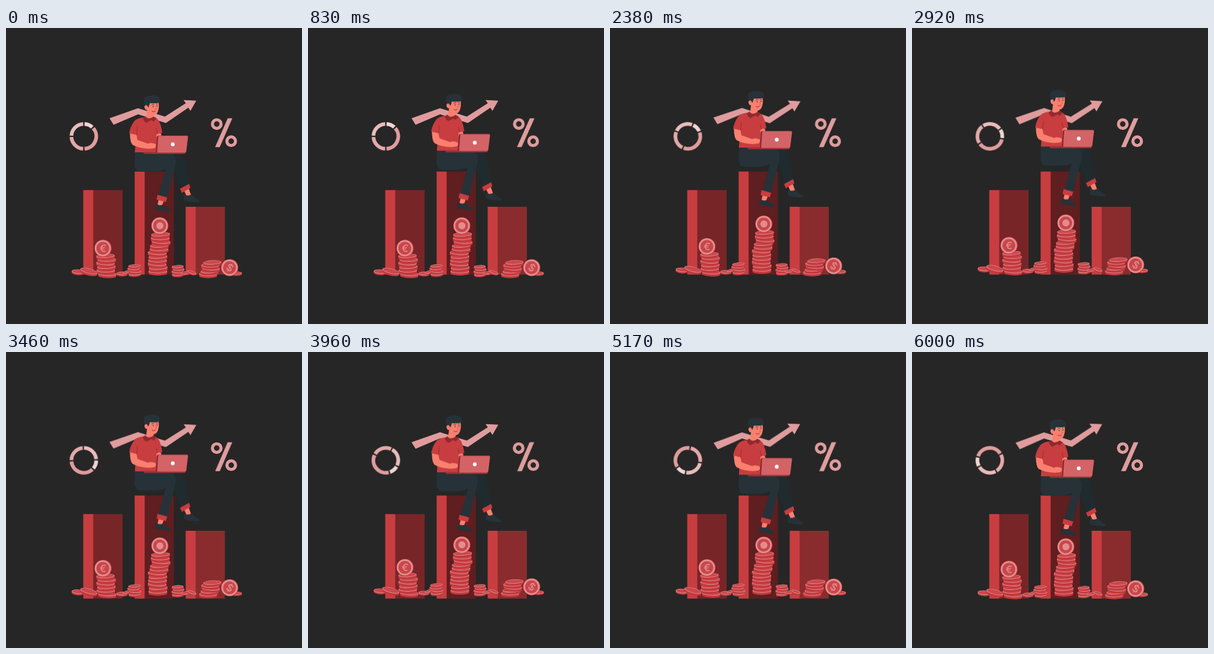
Write an HTML page that moves like this. It is 500 px wide and 500 px high and loops after 6.04 s.

```html
<!DOCTYPE html>
<html lang="en">
<head>
<meta charset="utf-8">
<title>Growth chart</title>
<style>
  html, body { margin: 0; width: 100%; height: 100%; overflow: hidden; background: #262626; }
  svg { display: block; width: 100%; height: 100%; }
  svg g { animation: 6.04s linear infinite; }

  #man { animation-name: float; }
  #coins { animation-name: lateFloat; }
  #donut { animation-name: spin; transform-origin: 131.5px 183px; }
  #percent { animation-name: sway; transform-origin: 368px 177px; }
  #arrow { animation-name: lateSway; transform-origin: 248px 142px; }

  @keyframes float {
    0%, 99.34%, 100% { transform: translateY(0); }
    49.67% { transform: translateY(-10px); }
  }
  /* starts at 1.5 s, cut off by the loop */
  @keyframes lateFloat {
    0%, 24.83% { transform: translateY(0); }
    74.5% { transform: translateY(-10px); }
    100% { transform: translateY(-4.87px); }
  }
  /* 60 degrees per second from 2 s on */
  @keyframes spin {
    0%, 33.11% { transform: rotate(0); }
    100% { transform: rotate(242.4deg); }
  }
  @keyframes sway {
    0%, 99.34%, 100% { transform: rotate(0); }
    24.83% { transform: rotate(1deg); }
    74.5% { transform: rotate(-1deg); }
  }
  @keyframes lateSway {
    0%, 16.56% { transform: rotate(0); }
    41.39% { transform: rotate(1deg); }
    91.06% { transform: rotate(-1deg); }
    100% { transform: rotate(-.64deg); }
  }

  .red { fill: #c83d40; }
  .dark { fill: #263238; }
  .skin { fill: #f9806f; }
  .pink { fill: #e09c9d; }
  .line { fill: none; stroke-linecap: round; }
  text { font: 500 17px Inter, Arial, sans-serif; text-anchor: middle; fill: #e28c8e; }
</style>
</head>
<body>
<svg viewBox="0 0 500 500">
  <g id="donut" fill="none" stroke-width="6.2"></g>

  <g id="percent">
    <path class="pink" d="M374.5 152.5H382.3L361 201.3H353.2Z"/>
    <circle cx="356" cy="162.3" r="7.3" fill="none" stroke="#e09c9d" stroke-width="5.2"/>
    <circle cx="380.4" cy="191.2" r="7.3" fill="none" stroke="#e09c9d" stroke-width="5.2"/>
  </g>

  <g id="arrow">
    <path class="pink" stroke="#e09c9d" stroke-width="1.1" d="M175.7 152.7L223 136.2L268.5 150.2L304.5 127.3L301 122.3L320.5 123.2L311.5 139L308.2 133.8L270 160L223 145.3L182 162.8Z"/>
  </g>

  <path fill="#782528" d="M147 273.7H197V416.5H147Z"/>
  <path class="red" d="M130.5 273.7H147.4V416.5H130.5Z"/>
  <path fill="#5f1e20" d="M234 242.6H283.5V416.5H234Z"/>
  <path class="red" d="M217.3 242.6H234.2V416.5H217.3Z"/>
  <path fill="#8a2c2e" d="M320 302H369.7V416.5H320Z"/>
  <path class="red" d="M303.5 302H320.3V416.5H303.5Z"/>

  <g id="man">
    <!-- feet -->
    <path class="skin" d="M301 275L308.5 271L313 283Q309 287 305 284Z"/>
    <path class="dark" d="M301 281Q306 285 313.5 281Q319 287 326 291Q328 293.5 325 294.5Q312 294 302 291.5Q298.5 290 301 281Z"/>
    <path class="skin" d="M258 290L266.5 292L264 299Q259 301 256 298Z"/>
    <path class="dark" d="M253.3 297Q258 301 265 298.5Q270 303.5 277.5 306.5Q279 310 274 310.2Q263 308.5 253 307.3Q250.5 305 253.3 297Z"/>
    <!-- legs -->
    <path fill="#202b30" d="M262 211H289Q299 212 301.5 221L311 265L297 273L280 231Z"/>
    <path class="dark" d="M218 209L276 210Q289 215 286.5 230L272.3 287L257 283L270 238Q262 242.5 248 242.5H226Q219 242 217 232Z"/>
    <path class="red" d="M294 271.5L309.3 263.3L311.5 270.3L297 278.5Z"/>
    <path class="red" d="M256 281.7L272.3 286.3L270 294L254.3 290Z"/>

    <!-- neck, shirt -->
    <path class="skin" d="M238.5 136L236.5 152Q243 160 249.5 151L249 144Z"/>
    <path class="red" d="M232 151Q222 152 217 157Q210 166 208 177.5L220 180.5L217.7 210H255L258 180L264 177Q262 162 257 155Q253 151 249.5 150.5Q245 159 236 151.5Z"/>
    <path class="line" d="M222 167L220.5 181M253.5 170L256 180" stroke="#8f2a2e" stroke-width=".8"/>
    <path fill="#8f2a2e" d="M235.5 149Q240 156 249.5 149.5L254.5 152.5L249.5 158L245.5 155.5L237.5 160Q231.5 157 231 152Z"/>

    <!-- head -->
    <path class="skin" d="M237 125L257.3 122.5Q259 131 257.8 136.5Q256 146.5 250 147.5Q243 147.5 238.5 139Z"/>
    <path class="dark" d="M235.5 133Q231.8 127 233 120Q236 114 244 114.5Q250 112.5 257 116Q261.5 119 259.3 126Q254 128 243 127Q242.5 131 239.5 135.5Z"/>
    <ellipse class="skin" cx="237" cy="134.3" rx="2.9" ry="4" transform="rotate(-18 237 134.3)"/>
    <circle class="dark" cx="248.6" cy="132.6" r=".9"/>
    <circle class="dark" cx="255.2" cy="131.6" r=".9"/>
    <path class="line" d="M246.3 130Q248.3 128.3 250 129.3M253.7 128.8L256 128.6" stroke="#263238" stroke-width=".8"/>
    <path class="line" d="M252.8 132.5L254.3 136.8L252.3 137.3" stroke="#d3554c" stroke-width=".8"/>
    <path class="line" d="M246.5 140.5Q249.5 143 252.3 140.3" stroke="#7c2528" stroke-width=".9"/>

    <!-- arms and laptop -->
    <path class="skin" d="M254 180Q259 176.5 262 179L263.5 187H255Z"/>
    <path fill="#9d3235" d="M232 209.5H303.5Q304 212.5 301 212.8H235Q232 212.5 232 209.5Z"/>
    <path class="skin" d="M209.3 177.8L220.5 180.5L222 189L240 195.4Q246 193 252.5 196Q254.5 199.5 251 203L241 204Q224 203 214 197.5Q209.5 194 209.3 177.8Z"/>
    <path fill="#7f282b" d="M255 184Q255.5 181.5 258 181.5L259 210.5H253.3Z"/>
    <path fill="#d36366" d="M259 182H305.5Q307.7 182.2 307.5 184L304.5 208.5Q304 210.6 301.5 210.6H255.2L257 184Q257.2 182 259 182Z"/>
    <path class="line" d="M258.5 182H306" stroke="#a43639" stroke-width=".6"/>
    <circle cx="281.7" cy="196.5" r="3.2" fill="#fff"/>
  </g>

  <g id="coins"></g>
</svg>

<script>
  const byId = id => document.getElementById(id);

  // Donut: angles run clockwise from the top.
  function arc(from, to, color) {
    const at = deg => {
      const a = (deg - 90) * Math.PI / 180;
      return `${131.5 + 21 * Math.cos(a)} ${183 + 21 * Math.sin(a)}`;
    };
    const gap = 3.2;
    return `<path stroke="${color}" d="M${at(from + gap)}A21 21 0 0 1 ${at(to - gap)}"/>`;
  }
  byId('donut').innerHTML =
    arc(0, 46, '#f0d4d4') + arc(46, 180, '#e09c9d') +
    arc(180, 270, '#e3a8a8') + arc(270, 360, '#e9bcbc');

  // A lying coin: edge below, rimmed face on top.
  function coin(x, y, rx, ry = 3.7, tilt = 0) {
    const h = rx * .22;
    return `<g transform="translate(${x} ${y}) rotate(${tilt})">
      <path fill="#c2393e" d="M${-rx} 0V${h}A${rx} ${ry} 0 0 0 ${rx} ${h}V0Z"/>
      <ellipse rx="${rx}" ry="${ry}" fill="#e08a8c"/>
      <ellipse cy="-.2" rx="${rx - 1}" ry="${ry - .8}" fill="#cc484c"/>
    </g>`;
  }

  // Listed from the top coin down, drawn from the bottom up.
  function stack(xs, top, step, rx, ry) {
    return xs.map((x, i) => coin(x, top + i * step, rx, ry, i % 3 * 3 - 3)).reverse().join('');
  }

  function disc(x, y, mark) {
    return `<g transform="translate(${x} ${y})">
      <circle r="14.4" fill="#c2393e"/>
      <circle cx="-.4" r="13.8" fill="#e28c8e"/>
      <circle cx="-.4" r="10.8" fill="#c9464a"/>${mark}
    </g>`;
  }
  const sign = (s, tilt) => `<text y="6" transform="rotate(${tilt})">${s}</text>`;

  byId('coins').innerHTML =
    coin(121.5, 411.5, 10.5, 3.8, 4) +
    coin(140, 410.6, 14.8, 4.4, 14) +
    stack([168, 170, 168, 169.5, 168.5, 171], 385, 6.1, 15.5) +
    disc(164, 372, sign('€', 5)) +
    coin(196, 414.6, 9.5, 3) +
    coin(204, 412, 7, 2.3, -18) +
    stack([217, 215.5, 218, 217.5], 401.7, 4.6, 10.5, 2.7) +
    stack([261, 260.5, 262, 259, 258.5, 255.5, 256.5, 256, 255.5, 257, 256.5], 348.5, 6.25, 15.8) +
    disc(260, 334, '<circle r="6" fill="#e28c8e"/>') +
    stack([290, 291.5, 289.5, 290.5], 403, 4.4, 10, 2.6) +
    coin(303, 413.5, 8, 2.5, -6) +
    coin(314, 412.7, 8, 2.7, 18) +
    stack([348.5, 345, 346, 344, 341.5], 396, 4.9, 15.2) +
    coin(389, 414, 9.5, 2.8) +
    disc(378, 404.8, sign('$', 32));
</script>
</body>
</html>
```
